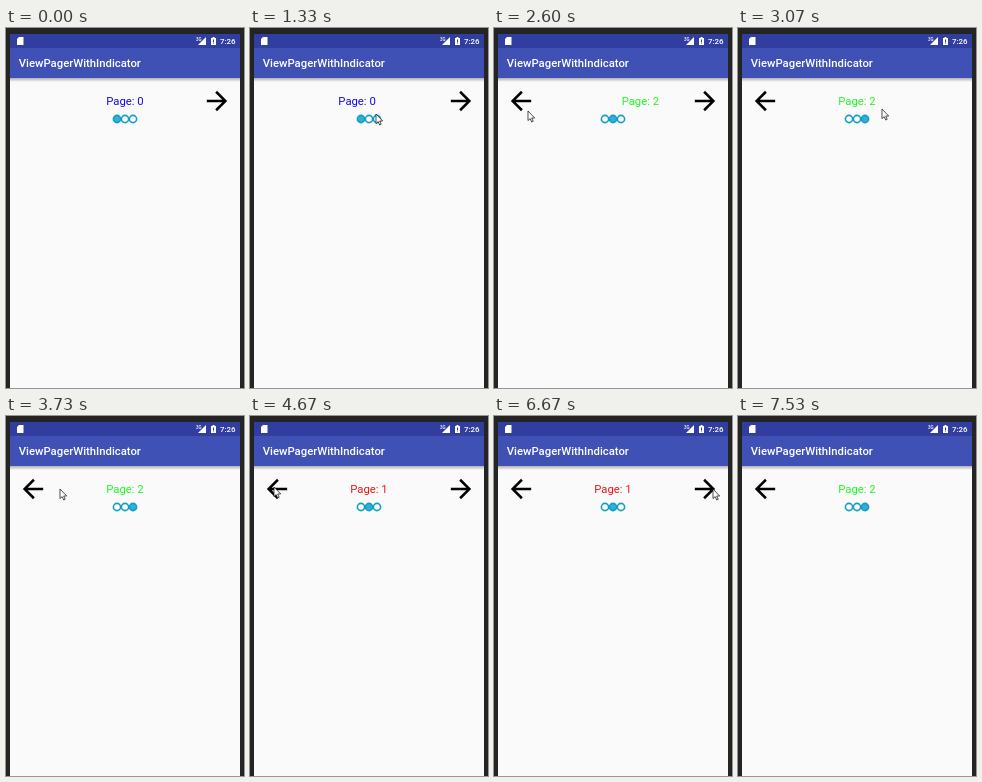
Recreate the animation shown at these times as an HTML page. Size 238 px wide and 360 px high, loop 7.79 s.

```html
<!DOCTYPE html>
<html lang="en">
<head>
<meta charset="utf-8">
<title>View pager with indicator</title>
<style>
  html, body { margin: 0; width: 100%; height: 100%; overflow: hidden; background: #242424; }
  svg { display: block; width: 100%; height: 100%; }
  text { font-family: Roboto, sans-serif; }
  .bar { fill: #fff; font-weight: 500; }
  .page { font-size: 11.3px; text-anchor: middle; }
  .dot { fill: #fff; stroke: #109fc9; stroke-width: 1.6; }
  .dot.on { fill: #38acd4; }
</style>
</head>
<body>
<svg viewBox="0 0 238 360">
  <defs>
    <linearGradient id="shadow" x2="0" y2="1">
      <stop stop-color="#000" stop-opacity=".3"/>
      <stop offset="1" stop-color="#000" stop-opacity="0"/>
    </linearGradient>
    <clipPath id="screen"><path d="M4 6h230v354H4z"/></clipPath>
    <path id="arrow" d="M0-8l-1.41 1.41L4.17-1H-8v2H4.17l-5.58 5.59L0 8l8-8z"/>
  </defs>

  <path fill="#242424" d="M0 0h238v360H0z"/>
  <g clip-path="url(#screen)">
    <path fill="#fafafa" d="M4 6h230v354H4z"/>
    <path fill="url(#shadow)" d="M4 50h230v4H4z"/>
    <path fill="#303f9f" d="M4 6h230v14H4z"/>
    <path fill="#3f51b5" d="M4 20h230v30H4z"/>
    <path fill="#fff" d="M13 9h4.500v8h-6.500v-6z"/>
    <text class="bar" x="190" y="12.500" font-size="4.500">3G</text>
    <path fill="#fff" d="M200 9v8h-8z"/>
    <path fill="#fff" d="M206.500 9h2v1h1.500v7h-5v-7h1.500z"/>
    <path fill="#303f9f" d="M207 11.500h1v2.500h-1zm0 3h1v1h-1z"/>
    <text class="bar" x="214" y="16" font-size="7.900">7:26</text>
    <text class="bar" x="12.800" y="39" font-size="11.300">ViewPagerWithIndicator</text>

    <g id="pages">
      <text class="page" x="119" y="77" fill="#1008e8">Page: 0</text>
      <text class="page" x="349" y="77" fill="#f01414">Page: 1</text>
      <text class="page" x="579" y="77" fill="#20f820">Page: 2</text>
    </g>
    <use id="back" href="#arrow" transform="translate(27 73) scale(-1.270 1.270)"/>
    <use id="next" href="#arrow" transform="translate(211 73) scale(1.270)"/>
    <circle class="dot" cx="111" cy="91" r="3.600"/>
    <circle class="dot" cx="119" cy="91" r="3.600"/>
    <circle class="dot" cx="127" cy="91" r="3.600"/>
  </g>
  <path id="cursor" fill="#fff" stroke="#222" stroke-width=".8"
        d="M0 0v9.600l2.200-2 1.500 3.400 1.500-.7-1.500-3.300h3z"/>
</svg>
<script>
  const LOOP = 7790, PAGE_WIDTH = 230, CLICK_TIME = 270;
  const byId = id => document.getElementById(id);
  const dots = document.querySelectorAll('.dot');

  const linear = u => u;
  const smooth = u => u * u * (3 - 2 * u);
  const settle = u => 1 - (1 - u) ** 5;

  // [time, page position, easing towards it]
  const click = (time, from, to) => [[time, from, linear], [time + CLICK_TIME, to, settle]];
  const scroll = [
    [0, 0], [1250, 0, linear], [1330, .048, linear], [1480, .65, linear], [1700, 1, settle],
    [2420, 1, linear], [2600, 1.878, linear], [2800, 2, settle],
    ...click(4380, 2, 1), ...click(5060, 1, 0), ...click(5620, 0, 1), ...click(6880, 1, 2)
  ];
  // [time, selected page]
  const selected = [[0, 0], [1480, 1], [2660, 2], [4380, 1], [5060, 0], [5620, 1], [6880, 2]];
  // [time, x, y]
  const pointer = [
    [70, 5, 78], [800, 186, 88], [1150, 150, 87], [1330, 126, 86], [1600, 30, 90],
    [1750, 24, 92], [2400, 186, 88], [2600, 34, 83], [2750, 28, 84], [3230, 184, 80],
    [3730, 54, 73], [4000, 24, 71], [5120, 24, 71], [5500, 219, 73], [7050, 219, 73]
  ];

  // Key reached most recently at time t
  const lastKey = (keys, t) => keys.findLastIndex(key => key[0] <= t);

  function between(keys, t, column, easing) {
    const i = Math.max(0, lastKey(keys, t));
    const a = keys[i], b = keys[i + 1];
    if (!b) return a[column];
    const ease = easing || b[2];
    return a[column] + (b[column] - a[column]) * ease((t - a[0]) / (b[0] - a[0]));
  }

  const show = (id, visible) => byId(id).setAttribute('visibility', visible ? 'visible' : 'hidden');
  const move = (id, x, y) => byId(id).setAttribute('transform', `translate(${x} ${y})`);

  function draw(t) {
    const page = selected[lastKey(selected, t)][1];
    move('pages', -PAGE_WIDTH * between(scroll, t, 1), 0);
    show('back', page > 0);
    show('next', page < 2);
    dots.forEach((dot, i) => dot.classList.toggle('on', i === page));
    show('cursor', t >= 70 && t < 7050);
    move('cursor', between(pointer, t, 1, smooth), between(pointer, t, 2, smooth));
  }

  const start = performance.now();
  function tick() {
    draw((performance.now() - start) % LOOP);
    requestAnimationFrame(tick);
  }
  tick();
</script>
</body>
</html>
```
